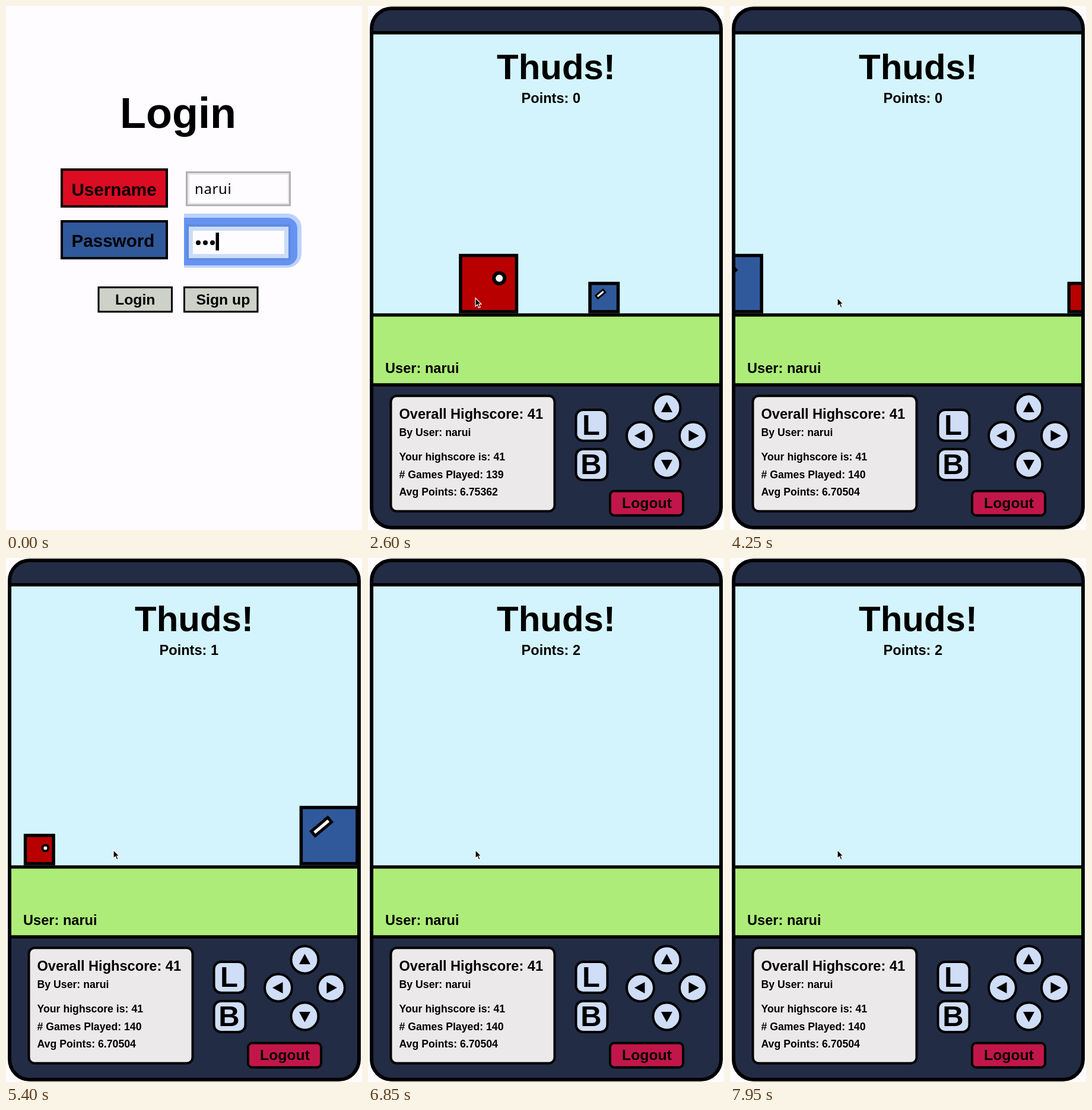
These frames come from a looping animation (600 px wide and 881 px high, 8000 ms). An HTML page:

```html
<!DOCTYPE html>
<html lang="en">
<head>
<meta charset="utf-8">
<title>Jump game</title>
<style>
  html, body { margin: 0; width: 100%; height: 100%; overflow: hidden; background: #fefcff; }
  svg { display: block; width: 100vw; height: 100vh; }
  text { font-family: "Liberation Sans", Arial, sans-serif; font-weight: bold; white-space: pre; }
  .mid { text-anchor: middle; }
  .field { font-family: "Noto Sans", sans-serif; font-weight: normal; letter-spacing: .6px; }
  .box { stroke: #000; }
  .pad { fill: #cfddf6; stroke: #000; stroke-width: 4; }
</style>
</head>
<body>
<svg viewBox="0 0 600 881">
  <defs>
    <clipPath id="ring"><rect x="300" y="340" width="210" height="110"/></clipPath>
    <clipPath id="screen"><rect x="6" y="45" width="589" height="592"/></clipPath>
  </defs>
  <g id="login"></g>
  <g id="game">
    <rect x="6" y="4" width="589" height="873" rx="34" fill="#232c45"/>
    <rect x="6" y="45" width="589" height="474" fill="#d3f4fd"/>
    <rect x="6" y="519" width="589" height="118" fill="#adec79"/>
    <path d="M6 45H595M6 519.5H595M6 637H595" stroke="#000" stroke-width="5.5"/>
    <g id="labels"></g>
    <g id="menu"></g>
    <g id="players" clip-path="url(#screen)"></g>
    <rect x="6" y="4" width="589" height="873" rx="34" fill="none" stroke="#000" stroke-width="6"/>
  </g>
  <path id="mouse" d="M0 0V14L3.4 11L5.8 16.4L8.2 15.3L5.9 10.2H10Z" stroke="#fff" stroke-width="1.2"/>
</svg>
<script>
const LOOP = 8000, USER = "narui";
const $ = id => document.getElementById(id);
const text = (x, y, size, s, extra = "") =>
  `<text x="${x}" y="${y}" font-size="${size}" ${extra}>${s}</text>`;
const mid = (x, y, size, s, extra = "") => text(x, y, size, s, `class="mid" ${extra}`);
const rect = (x, y, w, h, fill, line = 0, r = 0) =>
  `<rect x="${x + line / 2}" y="${y + line / 2}" width="${w - line}" height="${h - line}" rx="${r}"
    fill="${fill}" ${line ? `class="box" stroke-width="${line}"` : ""}/>`;
const arrow = (x, y, turn) => `<g transform="translate(${x} ${y}) rotate(${turn})">
  <circle r="23" class="pad"/><path d="M0 -10L9.5 7.5H-9.5Z"/></g>`;

$("login").innerHTML =
  mid(290, 205, 72, "Login") +
  rect(92, 273, 181, 66, "#dc0c22", 4) + text(110.5, 318.5, 29.6, "Username") +
  rect(92, 360, 181, 66, "#30599b", 4) + text(110.5, 405, 29.6, "Password") +
  rect(303, 278, 177, 58.5, "#b0b0b0") + rect(306, 281, 171, 52.5, "#e8e8e8") +
  rect(309, 284, 166, 47, "#fefcff") + text(318, 316, 24, USER, 'class="field"') +
  `<g clip-path="url(#ring)">` +
  rect(280, 349, 218, 91, "#bcd2fa", 0, 24) + rect(280, 356, 211, 80, "#6693f1", 0, 18) + "</g>" +
  rect(304, 367, 176, 60, "#5f8ae0") + rect(308, 371, 168, 53, "#cbdcfb") +
  rect(315, 378, 154, 39, "#fefcff") +
  [324, 336, 348].map(x => `<circle cx="${x}" cy="398" r="4"/>`).join("") +
  rect(353.5, 381, 5.5, 30, "#000") +
  rect(154.5, 471.5, 126.5, 44, "#cdd1c8", 3) + text(184, 501.5, 24.8, "Login") +
  rect(299, 471.5, 126.5, 44, "#cdd1c8", 3) + text(320.5, 501.5, 24.8, "Sign up");

$("labels").innerHTML =
  mid(317, 123, 60, "Thuds!") +
  text(258.5, 163, 23.6, "", 'id="points"') +
  text(29, 616.5, 23.6, "User: " + USER) +
  rect(36.5, 653.5, 280, 198, "#ebe9e9", 4, 10) +
  text(52.5, 694, 23.6, "Overall Highscore: 41") +
  text(52.5, 722.5, 17.7, "By User: " + USER) +
  text(52.5, 764, 17.7, "Your highscore is: 41") +
  text(52.5, 793.5, 17.7, "", 'id="games"') +
  text(52.5, 823, 17.7, "", 'id="avg"') +
  [["L", 677], ["B", 743]].map(([s, y]) =>
    rect(348.5, y, 57, 56, "#cfddf6", 4, 12) + mid(376, y + 44.3, 49, s)).join("") +
  arrow(503.5, 675.5, 0) + arrow(548, 722.5, 90) + arrow(503.5, 770.5, 180) + arrow(459, 722.5, 270) +
  rect(406, 813.5, 127, 45, "#c2164a", 4, 7) + text(428, 844, 24.8, "Logout");

$("menu").innerHTML =
  mid(308, 181, 29.4, "Instructions") + rect(224, 183, 168, 2.2, "#000") +
  mid(307, 210, 17.7, "-Press O to jump Player 1") +
  mid(306.5, 239.5, 17.7, "-Press P to jump Player 2") +
  mid(314.5, 269, 17.7, "-Big guy jumps over the small guy") +
  mid(301, 328, 29.5, "Press Spacebar to Start!", 'fill="#bb0008"');

// CSS ease-in-out: cubic-bezier(.42, 0, .58, 1)
function ease(x) {
  let lo = 0, hi = 1;
  for (let i = 0; i < 24; i++) {
    const s = (lo + hi) / 2, r = 1 - s;
    if (1.26 * r * r * s + 1.74 * r * s * s + s ** 3 < x) lo = s; else hi = s;
  }
  return lo * lo * (3 - 2 * lo);
}

// Each pass: shown from, shown until, motion start, duration, red is big, big one jumps
const passes = [
  [915, 2060, 915, 3000, false, false],
  [2183, 2640, 2183, 1000, true, false],
  [2640, 3350, 1262, 3000, true, false],
  [3424, 4454, 3424, 1030, false, true],
  [5050, 6350, 5050, 1300, false, true],
  [6785, 8000, 6785, 1230, true, true]
];

function player(x, big, lift, red) {
  const size = big ? 100 : 53, h = size / 2;
  const face = red
    ? `<circle cx="${big ? 18 : 10}" cy="${big ? -9 : -2.5}" r="${big ? 9 : 5}" fill="#fff"
        stroke="#000" stroke-width="${big ? 6 : 4}"/>`
    : `<g transform="translate(${big ? "-13 -15" : "-6 -6"}) rotate(-40)">` +
      (big ? rect(-20.5, -7.5, 41, 15, "#fff", 5) : rect(-9.5, -4.5, 19, 9, "#fff", 3)) + "</g>";
  return `<g transform="translate(${x} ${516.7 - h - lift})">` +
    rect(-h, -h, size, size, red ? "#b90000" : "#30599b", 5.5) + face + "</g>";
}

function drawPlayers(t) {
  const pass = passes.find(p => t >= p[0] && t < p[1]);
  if (!pass) return "";
  const [, , start, time, redBig, jumps] = pass;
  const p = Math.min(1, (t - start) / time), d = 350 * (1 - 2 * ease(p));
  // The jump begins shortly before the two meet
  const u = (t - start - time / 2 - 75) / 200;
  const lift = jumps ? Math.max(0, 143 * (1 - u * u)) : 0;
  return player(300.5 - d, redBig, redBig ? lift : 0, true) +
    player(300.5 + d, !redBig, redBig ? 0 : lift, false);
}

function mousePos(t) {
  const p = ease(Math.min(1, Math.max(0, (t - 50) / 700))), q = 1 - p;
  return [35 * q * q + 200 * p * q + 181 * p * p, 198 * q * q + 1130 * p * q + 491 * p * p];
}

function draw(t) {
  const playing = t >= 900;
  $("login").style.display = playing ? "none" : "";
  $("game").style.display = playing ? "" : "none";
  $("menu").style.display = t < 2060 || (t >= 2640 && t < 3350) ? "" : "none";
  $("points").textContent = t < 2060 ? "" : "Points: " + (t < 4900 ? 0 : t < 6650 ? 1 : 2);
  $("games").textContent = "# Games Played: " + (t < 2060 ? 138 : t < 3350 ? 139 : 140);
  $("avg").textContent = "Avg Points: " + (t < 2640 ? "6.75362" : "6.70504");
  $("players").innerHTML = drawPlayers(t);
  $("mouse").style.display = t < 50 ? "none" : "";
  $("mouse").setAttribute("transform", `translate(${mousePos(t)})`);
}

const begin = performance.now();
function tick() {
  draw((performance.now() - begin) % LOOP);
  requestAnimationFrame(tick);
}
tick();
</script>
</body>
</html>
```
